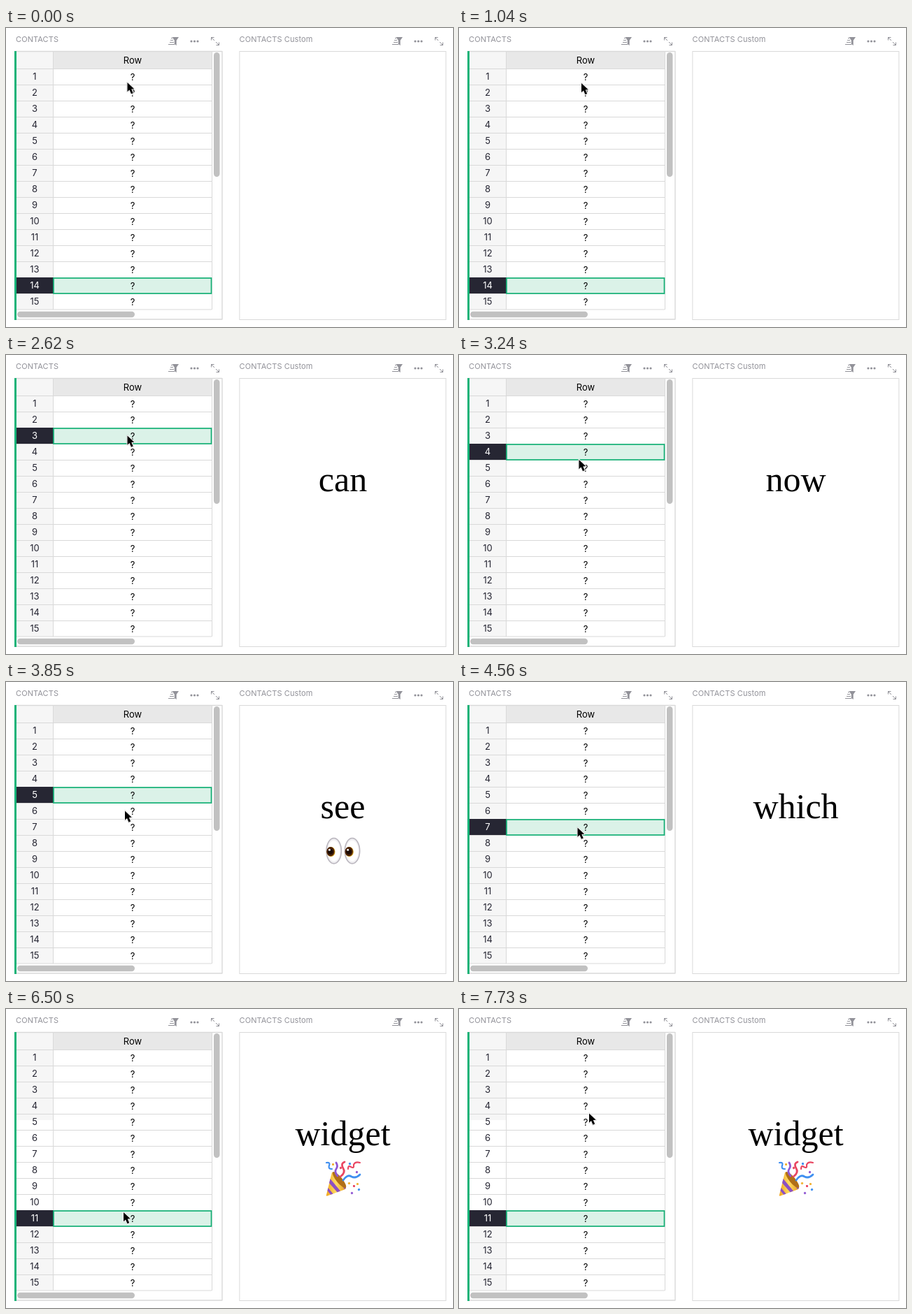
An HTML page for the animation above (8090 ms loop, 639 by 428 pixels).

```html
<!DOCTYPE html>
<html lang="en">
<head>
<meta charset="utf-8">
<title>Row picker and custom widget</title>
<style>
html, body { margin: 0; width: 100%; height: 100%; overflow: hidden; background: #fff; }
svg { display: block; width: 639px; height: 428px; }
text { font-family: Inter, "Liberation Sans", sans-serif; font-size: 13px; text-anchor: middle; fill: #262633; }
.title { font-size: 11px; text-anchor: start; fill: #929299; letter-spacing: .1px; }
.word { font-family: "Liberation Serif", serif; font-size: 50px; fill: #000; }
.line { stroke: #d9d9d9; fill: none; }
</style>
</head>
<body>
<svg viewBox="0 0 639 428">
  <defs>
    <linearGradient id="skin" x2="0" y2="1">
      <stop offset="0" stop-color="#ffd34f"/><stop offset="1" stop-color="#f3a927"/>
    </linearGradient>
    <linearGradient id="cone">
      <stop offset="0" stop-color="#f1a51f"/><stop offset=".5" stop-color="#ffdc62"/><stop offset="1" stop-color="#e79a1c"/>
    </linearGradient>
    <radialGradient id="eyeball">
      <stop offset=".75" stop-color="#fff"/><stop offset="1" stop-color="#e3e1e6"/>
    </radialGradient>
    <g id="tools">
      <path d="M236 14.5h2M235 17.5h4M234 20.5h6M232 23.5h9" stroke="#929299" stroke-width="1.2"/>
      <path d="M237.5 13H247L243.7 17.8V25L240.8 23V17.8Z" fill="#929299"/>
      <g fill="#929299"><circle cx="265" cy="19" r="1.6"/><circle cx="269.5" cy="19" r="1.6"/><circle cx="274" cy="19" r="1.6"/></g>
      <path d="M293.5 17.5V13.5H297.5M293.5 13.5L298 18M304.5 20.5V24.5H300.5M304.5 24.5L300 20" fill="none" stroke="#929299"/>
    </g>
    <g id="eye">
      <ellipse rx="10.7" ry="18.2" fill="url(#eyeball)" stroke="#b9b5bd" stroke-width="1.5"/>
      <ellipse cx="-4.2" cy="1.3" rx="6" ry="7" fill="#c89411"/>
      <ellipse cx="-4.8" cy="1" rx="5.6" ry="6.6" fill="#482008"/>
      <circle cx="-5" cy="1" r="3.8" fill="#190b05"/>
      <circle cx="-6.3" cy="-1.5" r="1.5" fill="#fff"/>
    </g>
  </defs>

  <text class="title" x="14" y="20">CONTACTS</text>
  <text class="title" x="333.5" y="20">CONTACTS Custom</text>
  <use href="#tools"/><use href="#tools" x="320"/>

  <rect x="15" y="34" width="53" height="369" fill="#f6f6f6"/>
  <rect id="pale" x="15" y="159" width="52" height="152" fill="#fff"/>
  <rect x="68" y="34" width="226" height="24" fill="#e8e8e8"/>
  <text x="181" y="51" style="fill:#000">Row</text>
  <g id="rows"></g>
  <path class="line" d="M67.5 34V403M294.5 34V403"/>
  <g id="selection">
    <rect x="15" y="-1" width="53" height="23" fill="#262633"/>
    <rect x="68" y="0" width="225.5" height="22" fill="#dbf2e8" stroke="#16b378" stroke-width="1.7"/>
    <text id="selectedNumber" x="41" y="15.3" style="fill:#fff"></text>
    <text x="181" y="16" style="fill:#000">?</text>
  </g>
  <path class="line" d="M12 33.5H309M309 33V417M12 417H309.5" stroke-width="1.4"/>
  <rect x="12" y="33" width="3" height="385" fill="#16b378"/>
  <rect x="297" y="35" width="8.5" height="178" rx="4.2" fill="#c1c1c1"/>
  <rect x="16" y="405.7" width="168" height="8.5" rx="4.2" fill="#c1c1c1"/>

  <rect class="line" x="333.9" y="33.5" width="295" height="384"/>
  <text id="word" class="word"></text>

  <g id="hand" stroke="#d58a1b" stroke-width=".9" stroke-linejoin="round" fill="url(#skin)">
    <path d="M399 178.8Q401 177.2 405 177.6L417 177.8Q418 174 423 172L427 169Q428 166.3 431 167Q434 168 432 172L440 172Q446 176 447 181V192Q445 198 436 199H427Q420 198 419 192L416 186L402 183.4Q397 181.5 399 178.8Z"/>
    <path d="M416 183Q413 187 417 188.5L427 188Q430 185 427 183Z"/>
    <path d="M420 188.5Q417 193 421 194L429 193.5Q432 190.5 429 188.3Z"/>
    <path d="M425 193.8Q422 198 427 199L433 198.5Q435 195.5 432 193.5Z"/>
    <path d="M418 178Q427 180 432 173" fill="none"/>
  </g>

  <g id="eyes"><use href="#eye" x="468.7" y="241.7"/><use href="#eye" x="495" y="241.7"/></g>

  <g id="party">
    <path d="M458 266L466 233.5Q478 237 486 256Q486 258 483 258.7L459.5 267.5Q457 268 458 266Z" fill="url(#cone)"/>
    <path d="M463.5 243L478 260.5L473.5 262.3L462 249ZM460.5 256L467.5 264.5L464 265.8L459.5 260ZM468 234L484 258L486 256Q480 241 468 234Z" fill="#8c50c4"/>
    <ellipse cx="476.5" cy="244.5" rx="4.2" ry="14.5" transform="rotate(-39 476.5 244.5)" fill="#b16f16"/>
    <g fill="none" stroke-width="2.8" stroke-linecap="round">
      <path d="M474 239Q469 233 472 229Q475 225 472 220" stroke="#8f57d3"/>
      <path d="M478 240Q486 234 482 228Q478 221 484 219" stroke="#e94662"/>
      <path d="M482 245Q488 236 494 240Q500 243 506 237" stroke="#3f8ff0"/>
      <path d="M458 220Q464 219 462 224Q460 229 466 229" stroke="#3f8ff0" stroke-width="2.2"/>
      <path d="M489 229Q489 223 493 226Q498 229 497 223Q499 218 506 220" stroke="#e94662" stroke-width="2.2"/>
    </g>
    <g id="confetti"></g>
  </g>

  <rect id="splitter" x="320.5" y="1" width="2" height="425" fill="#d9d9d9"/>
  <g id="arrow">
    <path d="M0 0V13.2L3 10.5L5.5 16.2L8.2 15L5.8 9.5L9.8 9.3Z" fill="#000" stroke="#fff" stroke-width="2" paint-order="stroke" stroke-linejoin="round" style="filter:drop-shadow(0 .7px .7px #0006)"/>
  </g>
  <path id="resize" d="M-8.5 0L-4 -4V-1.2H-1.5V-6H1.5V-1.2H4V-4L8.5 0L4 4V1.2H1.5V6H-1.5V1.2H-4V4Z" fill="#000" stroke="#fff" stroke-width="1.6" paint-order="stroke"/>
</svg>
<script>
const LOOP = 8090, STEP = 87, ROW_HEIGHT = 23;
const $ = id => document.getElementById(id);
const rowTop = row => 59 + (row - 1) * ROW_HEIGHT;
const show = (id, on) => $(id).setAttribute("visibility", on ? "visible" : "hidden");
const place = (id, x, y) => $(id).setAttribute("transform", `translate(${x} ${y})`);

// Start time of each selection, for rows 1 and up.
const clicks = [1380, 2180, 2620, 3060, 3590, 4120, 4560, 5080, 5610, 6050, 6500];
const words = ["Look", "you", "can", "now", "see", "below", "which", "record", "for", "this", "widget"];

// Pointer moves: start, number of steps, destination.
const moves = [
  [80, 2, 172.5, 68], [430, 4, 175.5, 84], [870, 5, 174, 70], [1467, 4, 174, 93.5],
  [2267, 3, 173.5, 115.5], [2707, 3, 172, 139], [3147, 4, 171, 161], [3677, 3, 170, 184.5],
  [4207, 3, 169.5, 208.5], [4647, 4, 168, 232], [5167, 4, 166.5, 254], [5700, 3, 167, 276],
  [6140, 4, 168, 291], [6590, 1, 169, 295], [6770, 4, 321, 210], [7470, 4, 186, 149.5]
];

for (let row = 1; row <= 15; row++) {
  const top = rowTop(row);
  $("rows").innerHTML += `<path class="line" d="M15 ${top - .5}H294"/>
    <text x="41" y="${top + 15.3}">${row}</text>
    <text x="181" y="${top + 16}" style="fill:#000">?</text>`;
}
$("rows").innerHTML += '<path class="line" d="M15 403H294"/>';

const confetti = [[466, 221], [477, 226], [490, 220], [500, 232], [489, 248], [496, 252], [503, 257], [493, 262], [501, 249]];
const colors = ["#f2b233", "#e94662", "#3f8ff0", "#8f57d3"];
$("confetti").innerHTML = confetti.map(([x, y], i) =>
  `<rect x="${x}" y="${y}" width="3" height="3" rx=".8" transform="rotate(${i * 35} ${x + 1.5} ${y + 1.5})" fill="${colors[i % 4]}"/>`).join("");

function pointerAt(time) {
  let x = 173.5, y = 78;
  for (const [start, steps, toX, toY] of moves) {
    if (time < start) break;
    const part = Math.min(1, (Math.floor((time - start) / STEP) + 1) / steps);
    const eased = part * part * (3 - 2 * part);
    x += (toX - x) * eased;
    y += (toY - y) * eased;
  }
  return [x, y];
}

function draw(time) {
  const row = clicks.filter(start => time >= start).length;
  const selected = row || 14;
  place("selection", 0, rowTop(selected));
  $("selectedNumber").textContent = selected;
  $("word").textContent = row ? words[row - 1] : "";
  $("word").setAttribute("x", row === 1 ? 512.5 : 481.5);
  $("word").setAttribute("y", row === 1 ? 202 : 194.5);
  show("hand", row === 1);
  show("eyes", row === 5);
  show("party", row === 11);
  show("pale", row === 11);

  const resizing = time >= 7030 && time < 7470;
  const [x, y] = pointerAt(time);
  place("arrow", x, y);
  place("resize", x, y);
  show("arrow", !resizing);
  show("resize", resizing);
  show("splitter", resizing);
}

const began = performance.now();
function tick() {
  draw((performance.now() - began) % LOOP);
  requestAnimationFrame(tick);
}
tick();
</script>
</body>
</html>
```
